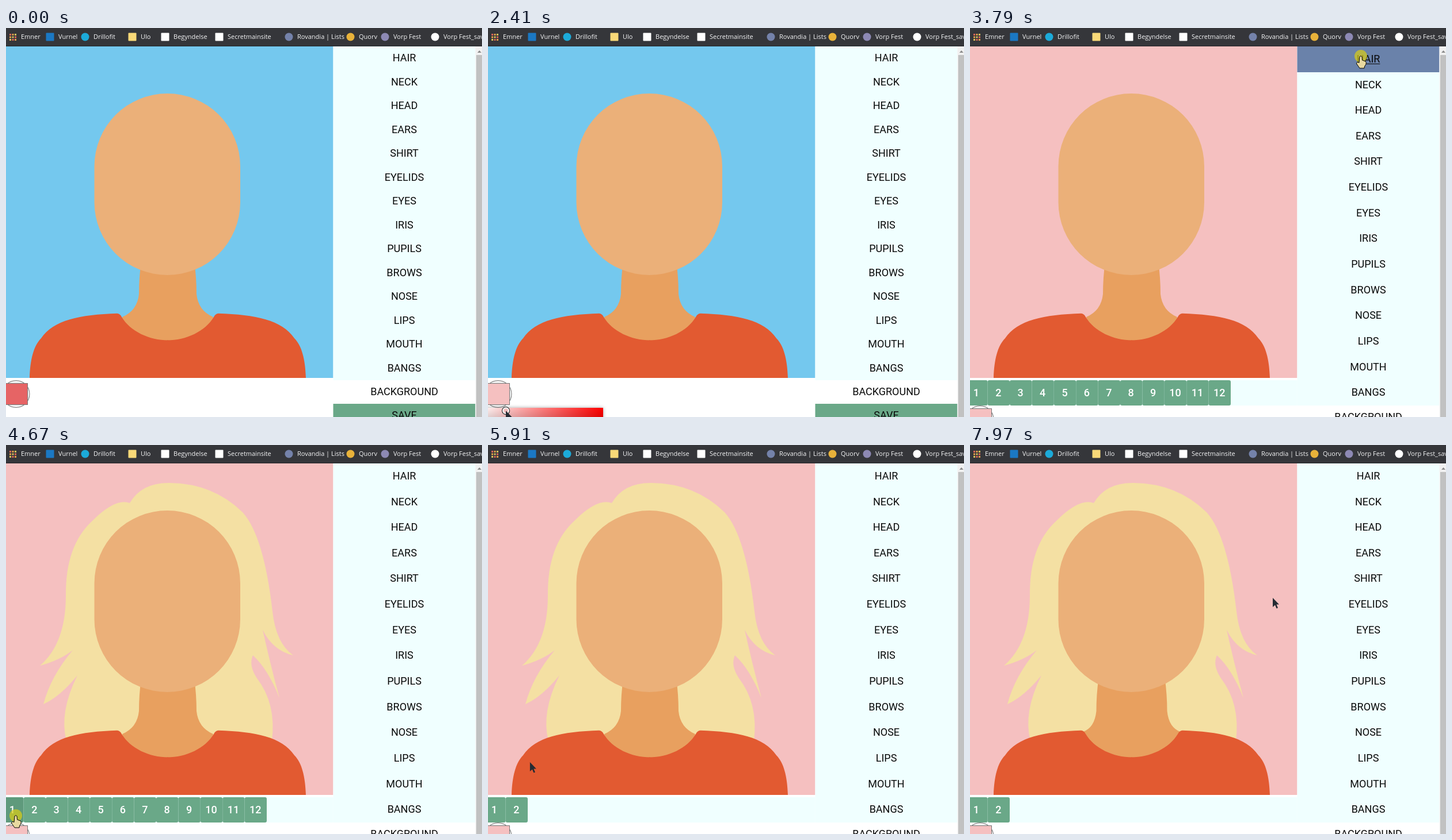
These frames come from a looping animation (827 px wide and 677 px high, 8000 ms). An HTML page with a canvas:

```html
<!DOCTYPE html>
<html lang="en">
<head>
<meta charset="utf-8">
<title>Avatar editor</title>
<style>
  html, body { margin: 0; width: 100%; height: 100%; overflow: hidden; background: #fff; }
  canvas { display: block; }
</style>
</head>
<body>
<canvas id="stage" width="827" height="677"></canvas>
<script>
const ctx = document.getElementById('stage').getContext('2d');
const LOOP = 8000, W = 827, H = 677;
const GREEN = '#6aa888', BLUE = '#6a82aa', AZURE = '#f0ffff', INK = '#0a0a0a';

// Layout
const TOP = 32, MID = 281;
const menu = { x: 568.5, w: 247, mid: 692, items: 'HAIR NECK HEAD EARS SHIRT EYELIDS EYES IRIS PUPILS BROWS NOSE LIPS MOUTH BANGS'.split(' ') };
const option = { x: -7.8, y: 613, w: 38.4, h: 44 };
const field = { x: -16, y: 661, w: 216, h: 130 };
const swatch = { x: 17.5, size: 48 };

// When the page changes
const at = { pickerOpen: 640, drag: 1920, dragEnd: 2410, apply: 2610, hairMenu: 3780, hair: 4620, neckMenu: 5440, neck: 6400 };
const taps = [580, at.apply, 3760, 4590, 5420, 6380];
const TAP_TIME = 100, HOVER_LAG = 30;

// Pointer moves; a higher snap brakes harder
const start = { x: 62, y: 690 };
const move = (from, to, x, y, snap = 1) => ({ from, to, x, y, snap });
const moves = [
  move(380, 560, 22, 634),
  move(760, 1120, 54, 668),
  move(1480, 1720, 47, 669),
  move(at.drag, at.dragEnd, 31, 666),
  move(at.apply - 10, at.apply, 192, 632),
  move(3000, 3590, 679, 49, 4.6),
  move(3880, 4510, 17, 645, 2),
  move(4700, 5370, 669, 111, 3),
  move(5520, 6180, 56, 640, 2),
  move(6660, 7380, 720, 140, 6.4),
  move(7830, 7970, 526, 266, 2)
];

// Bookmarks: text x, icon colour, label, square icon
const bookmarks = [
  [91, '#1b78c4', 'Vurnel', true], [152, '#1caad9', 'Drillofit'], [234, '#f9d978', 'Ulo', true],
  [291, '#fff', 'Begyndelse', true], [385, '#fff', 'Secretmainsite', true], [506, '#7482aa', 'Rovandia | Lists'],
  [613, '#e8b23a', 'Quorv'], [673, '#8d89b4', 'Vorp Fest'], [760, '#fff', 'Vorp Fest_sav']
];

const hairShape = new Path2D('M215 101Q236 65 285 66Q360 67 411 117Q448 158 463 290Q469 345 499 366Q464 358 446 322Q460 385 475 440Q455 390 429 366Q421 383 436 406Q470 450 462 515H105Q92 465 124 401Q94 438 65 451Q78 402 116 357Q95 374 59 384Q104 345 104 262Q103 175 150 132Q190 92 215 101Z');
const halfShirt = new Path2D('M-1 543.5C32 543.5 65 528 80 503Q83 497 88 496.8C153 499 198 508 220 540C233 553 239 577 240 609H-1Z');
const handShape = new Path2D('M-2 1Q0 -2 2 1L2.5 7L8 9Q10 10 9 14L6.5 18L6 21H-2L-7.5 13Q-7 9 -3 11.5Z');
const arrowShape = new Path2D('M0 0V16L4 12.5L6.5 18.5L9 17.5L6.5 11.5H11Z');

const mix = (a, b, k) => a + (b - a) * k;
const easeOut = (k, n) => 1 - (1 - k) ** n;

function rect(x, y, w, h, color) {
  ctx.fillStyle = color;
  ctx.fillRect(x, y, w, h);
}

function roundRect(x, y, w, h, r, color) {
  ctx.fillStyle = color;
  ctx.beginPath();
  ctx.roundRect(x, y, w, h, r);
  ctx.fill();
}

const circle = (x, y, r, color) => roundRect(x - r, y - r, 2 * r, 2 * r, r, color);

function fill(path, color) {
  ctx.fillStyle = color;
  ctx.fill(path);
}

// Fills half a shape and its reflection in the middle of the portrait
function fillMirrored(half, color) {
  for (const side of [1, -1]) {
    ctx.save();
    ctx.translate(MID, 0);
    ctx.scale(side, 1);
    fill(half, color);
    ctx.restore();
  }
}

function label(str, x, midY, color = INK, weight = 400) {
  ctx.font = `${weight} 18px Roboto, sans-serif`;
  ctx.textAlign = 'center';
  ctx.fillStyle = color;
  ctx.fillText(str, x, Math.round(midY + 5.6));
}

// Sideways travel brakes sooner than vertical, which bends the path
function pointer(t) {
  let p = start;
  for (const m of moves) {
    if (t <= m.from) break;
    const k = Math.min(1, (t - m.from) / (m.to - m.from));
    const sideSnap = m.snap > 1 ? 2 * m.snap : 1;
    p = { x: mix(p.x, m.x, easeOut(k, sideSnap)), y: mix(p.y, m.y, easeOut(k, m.snap)) };
  }
  return p;
}

const optionCount = t => t < at.hairMenu ? 0 : t < at.neckMenu ? 12 : 2;

function optionUnder(p, count) {
  const i = Math.floor((p.x - option.x) / option.w);
  return p.y > option.y && p.y < option.y + option.h && i < count ? i : -1;
}

// Place of the ring in the colour field
const ring = t => t < at.drag ? { x: 106, y: 674 } : pointer(Math.min(t, at.dragEnd));

function pickedColor(t) {
  if (t < at.drag) return '#e66465';
  const p = ring(t);
  const value = 255 * (1 - (p.y - field.y) / field.h);
  const low = value * (1 - (p.x - field.x) / field.w);
  return `rgb(${[value, low, low].map(Math.round)})`;
}

function drawBar() {
  rect(0, 0, W, TOP, '#35363a');
  rect(0, TOP - 1, W, 1, '#25262a');
  for (let i = 0; i < 9; i++) {
    const col = i % 3, row = Math.floor(i / 3);
    rect(6 + col * 4.5, 10 + row * 4.5, 3, 3, ['#e0665a', '#e8a04a', '#d9c25a'][(col + row) % 3]);
  }
  ctx.font = '11px "Open Sans", sans-serif';
  ctx.textAlign = 'left';
  for (const [x, color, name, square] of [[26, '', 'Emner'], ...bookmarks]) {
    if (color) roundRect(x - 21.5, 8.5, 14, 14, square ? 1 : 7, color);
    ctx.fillStyle = '#f4f5f6';
    ctx.fillText(name, x, 19);
  }
}

function drawNeck(half) {
  const grow = half - 50;
  const path = new Path2D(`M-1 405H${half - 4}Q${half} 435 ${half} 463Q${half + 3} 492 ${79 + grow / 2} ${503 - grow / 3}L66 560H-1Z`);
  fillMirrored(path, '#e8a05f');
}

function drawAvatar(t) {
  rect(0, TOP, menu.x, 577, t < at.apply ? '#74c8ee' : pickedColor(t));
  if (t >= at.hair) fill(hairShape, '#f4e0a3');
  drawNeck(t < at.neck ? 50 : 61.5);
  roundRect(153.5, 114, 253.5, 316, 126.75, '#ebb079');
  fillMirrored(halfShirt, '#e25a31');
}

function drawMenu(bottom, hover) {
  const rowH = (bottom - TOP) / menu.items.length;
  rect(menu.x, TOP, menu.w, bottom - TOP, AZURE);
  const active = hover.x > menu.x ? Math.floor((hover.y - TOP) / rowH) : -1;
  menu.items.forEach((name, i) => {
    const y = TOP + i * rowH, mid = y + rowH / 2;
    if (i === active) rect(menu.x, Math.round(y), menu.w, Math.round(rowH), BLUE);
    label(name, menu.mid, mid);
    if (i === active) {
      const w = ctx.measureText(name).width;
      rect(menu.mid - w / 2, Math.round(mid + 7.6), w, 1, INK);
    }
  });
  label('BACKGROUND', menu.mid, bottom + 20.5);
  rect(menu.x, bottom + 41, menu.w, 41, GREEN);
  label('SAVE', menu.mid, bottom + 61.5);
}

function drawOptions(count, hover) {
  rect(0, option.y, menu.x, option.h, AZURE);
  const active = optionUnder(hover, count);
  for (let i = 0; i < count; i++) {
    const x = option.x + i * option.w;
    roundRect(x, option.y, option.w, option.h, 3, i === active ? '#5f9a7c' : GREEN);
    label(i + 1, x + option.w / 2 - 0.5, option.y + option.h / 2, '#fff', 500);
  }
}

function drawSwatch(t, top) {
  circle(swatch.x, top + swatch.size / 2, swatch.size / 2, '#767676');
  circle(swatch.x, top + swatch.size / 2, swatch.size / 2 - 1, '#f2f2f2');
  rect(-3, top + 5, 41, 38, '#777');
  rect(-2, top + 6, 39, 36, pickedColor(t));
}

function fade(x1, y1, from, to) {
  const g = ctx.createLinearGradient(field.x, field.y, x1, y1);
  g.addColorStop(0, from);
  g.addColorStop(1, to);
  return g;
}

function drawPicker(t) {
  const { x, y, w, h } = field;
  ctx.save();
  ctx.shadowColor = 'rgba(0,0,0,.35)';
  ctx.shadowBlur = 6;
  rect(x, y, w, h, fade(x + w, y, '#fff', '#f00'));
  ctx.restore();
  rect(x, y, w, h, fade(x, y + h, 'rgba(0,0,0,0)', '#000'));
  const p = ring(t);
  circle(p.x, p.y, 7, '#111');
  circle(p.x, p.y, 6, '#fff');
  circle(p.x, p.y, 4, pickedColor(t));
}

function drawScrollbar() {
  rect(815.5, TOP, 11.5, H - TOP, '#f1f1f1');
  rect(817, 47, 10, H - 47, '#c1c1c1');
  fill(new Path2D('M819 43L822.5 39L826 43Z'), '#8a8a8a');
}

function drawPointer(t, count) {
  const p = pointer(t);
  const dragging = t >= at.drag && t < at.dragEnd;
  const pressed = dragging || taps.some(tap => t >= tap && t < tap + TAP_TIME);
  const hand = p.x > menu.x || optionUnder(p, count) >= 0;
  if (pressed) circle(p.x, p.y, 11, 'rgba(220,205,20,.7)');
  ctx.save();
  ctx.translate(p.x, p.y);
  if (hand) {
    fill(handShape, pressed ? '#e8d9a0' : '#050505');
    if (pressed) ctx.stroke(handShape);
  } else {
    fill(arrowShape, '#252b33');
  }
  ctx.restore();
}

function draw(t) {
  const count = optionCount(t);
  const bottom = option.y + (count ? option.h : 0);
  const hover = pointer(t - HOVER_LAG);
  rect(0, 0, W, H, '#fff');
  drawAvatar(t);
  drawMenu(bottom, hover);
  if (count) drawOptions(count, hover);
  drawSwatch(t, bottom);
  if (t >= at.pickerOpen && t < at.apply) drawPicker(t);
  drawScrollbar();
  drawBar();
  drawPointer(t, count);
}

const began = performance.now();
function tick() {
  draw((performance.now() - began) % LOOP);
  requestAnimationFrame(tick);
}
tick();
</script>
</body>
</html>
```
